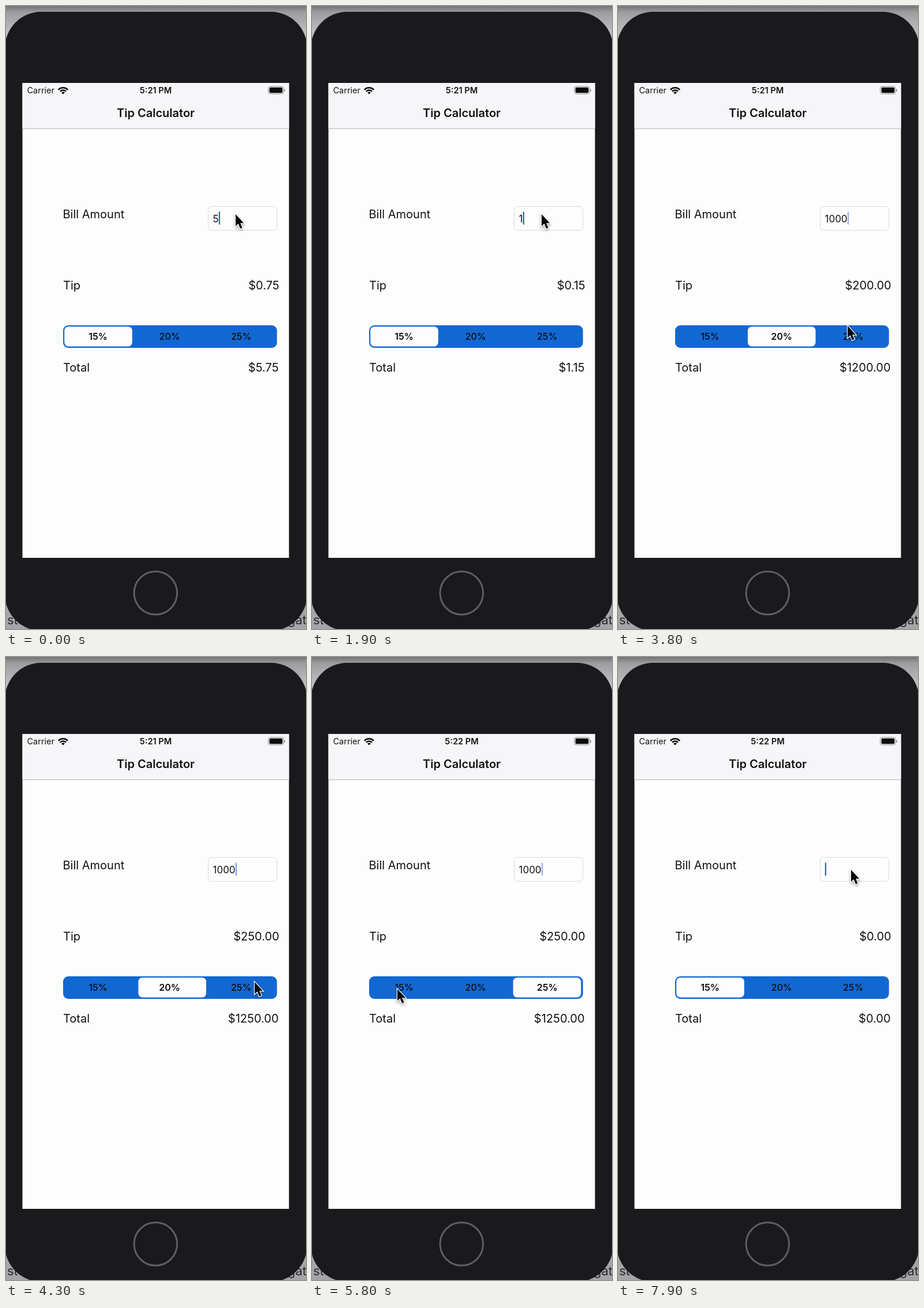
Recreate the animation shown at these times as an HTML page with a canvas. Size 520 px wide and 1077 px high, loop 8 s.

```html
<!DOCTYPE html>
<html lang="en">
<head>
<meta charset="utf-8">
<title>Tip Calculator</title>
<style>
html, body { margin: 0; width: 100%; height: 100%; overflow: hidden; }
canvas { display: block; width: 520px; height: 1077px; }
</style>
</head>
<body>
<canvas id="stage" width="520" height="1077"></canvas>
<script>
const ctx = document.getElementById('stage').getContext('2d');
const LOOP = 8000, STEP = 100;
const INK = '#111012', BLUE = '#1268d2', WHITE = '#fefdfe';
const RATES = [15, 20, 25];
const SLIDE = 350, LABEL_WIDTH = 176;

// time, x, y of the pointer tip
const POINTER = [
  [0, 398, 360], [2500, 398, 360], [3000, 277, 586], [3400, 277, 586],
  [3800, 398, 553], [4100, 431, 562], [4700, 431, 562], [5100, 163, 586],
  [5500, 148, 574], [6300, 148, 574], [6600, 392, 344],
  [6900, 404, 368], [8000, 404, 368]
];
// time, selected segment
const PICKS = [[0, 0], [3050, 1], [4260, 2], [6200, 0]];

const clamp = v => Math.max(0, Math.min(1, v));
const smooth = v => { const p = clamp(v); return p * p * (3 - 2 * p); };
const mix = (a, b, p) => a + (b - a) * p;

function pointerAt(t) {
  const i = Math.max(1, POINTER.findIndex(k => k[0] > t));
  const [t0, x0, y0] = POINTER[i - 1], [t1, x1, y1] = POINTER[i];
  const p = smooth((t - t0) / (t1 - t0));
  return [mix(x0, x1, p), mix(y0, y1, p)];
}

function segmentAt(t) {
  const i = PICKS.findLastIndex(k => k[0] <= t);
  const now = PICKS[i][1];
  const before = i ? PICKS[i - 1][1] : now;
  return { picked: now, thumb: mix(before, now, smooth((t - PICKS[i][0]) / SLIDE)) };
}

function billAt(t) {
  if (t < 1900) return '5' + '0'.repeat(Math.min(15, Math.floor(t / 100)));
  if (t < 7400) return '1' + '0'.repeat(Math.min(3, Math.floor((t - 1900) / 100)));
  if (t < 7900) return '1' + '0'.repeat(Math.max(0, 2 - Math.floor((t - 7400) / 100)));
  return '';
}

function caretAt(t) {
  if (t < 2400 || t >= 7400) return 1;
  const phase = t % 1000;
  return phase < 500 ? clamp((phase - 180) / 200) : clamp((880 - phase) / 160);
}

function setFont(size, weight = 400) {
  ctx.font = `${weight} ${size}px Inter, "Liberation Sans", sans-serif`;
}

function text(str, x, y, size, { weight = 400, align = 'left', color = INK } = {}) {
  setFont(size, weight);
  ctx.textAlign = align;
  ctx.fillStyle = color;
  ctx.fillText(str, x, y);
}

function box(x, y, w, h, r, fill, stroke) {
  ctx.beginPath();
  ctx.roundRect(x, y, w, h, r);
  if (fill) { ctx.fillStyle = fill; ctx.fill(); }
  if (stroke) { ctx.strokeStyle = stroke; ctx.lineWidth = 1; ctx.stroke(); }
}

function money(value, right, y) {
  let str = '$' + value.toFixed(2);
  setFont(20);
  if (ctx.measureText(str).width > LABEL_WIDTH) {
    while (ctx.measureText(str + '…').width > LABEL_WIDTH) str = str.slice(0, -1);
    str += '…';
  }
  text(str, right, y, 20, { align: 'right' });
}

function drawPhone() {
  const back = ctx.createLinearGradient(0, 0, 0, 1077);
  back.addColorStop(0, '#747375');
  back.addColorStop(0.01, '#9d9c9e');
  back.addColorStop(0.04, '#bcbbbd');
  back.addColorStop(1, '#a5a4a6');
  ctx.fillStyle = back;
  ctx.fillRect(0, 0, 520, 1077);
  text('sto', 2, 1069, 22, { color: '#2b2a2c' });
  text('gat', 521, 1069, 22, { align: 'right', color: '#2b2a2c' });
  box(-2, 10, 524, 1070, 63, '#1a191b');
  ctx.beginPath();
  ctx.arc(259.3, 1014.7, 37.3, 0, 7);
  ctx.strokeStyle = '#5f5e60';
  ctx.lineWidth = 3;
  ctx.stroke();
  box(28.5, 133, 462, 821, 0, WHITE);
}

function drawWifi(x, y) {
  const from = -Math.PI * 0.76, to = -Math.PI * 0.24;
  ctx.strokeStyle = ctx.fillStyle = '#0c0b0d';
  ctx.lineWidth = 2.6;
  for (const r of [7, 11.2]) {
    ctx.beginPath();
    ctx.arc(x, y, r, from, to);
    ctx.stroke();
  }
  ctx.beginPath();
  ctx.moveTo(x, y);
  ctx.arc(x, y, 4, from, to);
  ctx.fill();
}

function drawBars(t) {
  box(28.5, 133, 462, 79, 0, '#f6f5f7');
  box(28.5, 211.5, 462, 1.2, 0, '#bfbec0');
  text('Carrier', 36.5, 151, 14.5);
  drawWifi(99, 152.5);
  text(t < 5300 ? '5:21 PM' : '5:22 PM', 259.5, 151, 14.6, { weight: 600, align: 'center' });
  box(454.5, 139, 26.5, 13, 3.5, null, '#8b8a8c');
  box(456.5, 140.7, 22.8, 9.6, 2, '#0c0b0d');
  box(482, 143.5, 1.6, 4.5, 1, '#8b8a8c');
  text('Tip Calculator', 259.5, 192.3, 20, { weight: 600, align: 'center' });
}

function drawField(bill, caret) {
  box(350.5, 346.5, 119, 41.3, 6, WHITE, '#d8d7db');
  setFont(17);
  const width = ctx.measureText(bill).width;
  const left = Math.min(358.5, 461 - width);
  ctx.save();
  ctx.beginPath();
  ctx.rect(357, 348, 106, 38);
  ctx.clip();
  text(bill, left, 373.7, 17);
  ctx.globalAlpha = caret;
  box(left + width + 0.2, 355.5, 2.3, 22.5, 1, '#2f62d6');
  ctx.restore();
}

function drawSegments(thumb) {
  box(99, 552, 370.7, 39, 9, BLUE);
  box(101.2 + thumb * 123.7, 554.2, 117.6, 34.4, 7, WHITE);
  RATES.forEach((rate, i) => {
    const weight = Math.round(thumb) === i ? 600 : 500;
    text(rate + '%', 159.5 + i * 124.1, 577.3, 16, { weight, align: 'center', color: '#0b0b0f' });
  });
}

function drawPointer([x, y]) {
  const shape = [[0, 0], [0, 20.5], [4.6, 16.3], [8, 24.8], [11.6, 23.2], [8.2, 15.2], [14.2, 15.2]];
  ctx.save();
  ctx.translate(x, y);
  ctx.beginPath();
  shape.forEach(p => ctx.lineTo(...p));
  ctx.closePath();
  ctx.lineJoin = 'miter';
  ctx.strokeStyle = '#fff';
  ctx.lineWidth = 2.4;
  ctx.shadowColor = 'rgba(0,0,0,0.4)';
  ctx.shadowBlur = 4;
  ctx.shadowOffsetY = 2;
  ctx.stroke();
  ctx.shadowColor = 'transparent';
  ctx.fillStyle = '#060507';
  ctx.fill();
  ctx.restore();
}

function draw(t) {
  const bill = billAt(t);
  const amount = Number(bill);
  const { picked, thumb } = segmentAt(t);
  const tip = amount * RATES[picked] / 100;

  drawPhone();
  drawBars(t);
  text('Bill Amount', 98.5, 366.5, 20);
  text('Tip', 99, 489.7, 20);
  text('Total', 99, 632, 20);
  drawField(bill, caretAt(t));
  money(tip, 473.7, 489.7);
  drawSegments(thumb);
  money(amount + tip, 472.5, 631.7);
  drawPointer(pointerAt(t));
}

const start = performance.now();
function tick() {
  const t = (performance.now() - start) % LOOP;
  draw(Math.floor(t / STEP) * STEP);
  requestAnimationFrame(tick);
}
tick();
</script>
</body>
</html>
```
